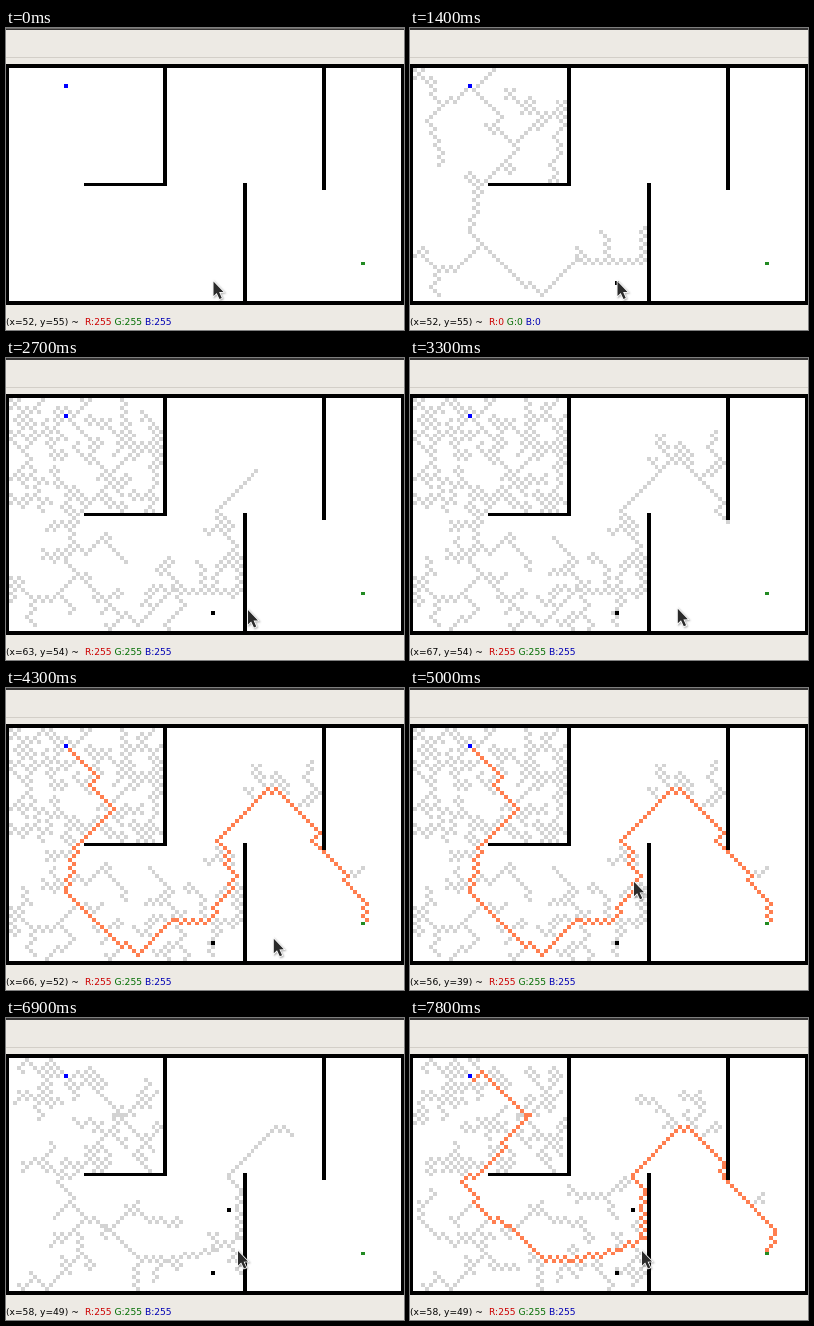
Animation, 398 px wide and 302 px high, one loop 8000 ms. Source, as an HTML page with a canvas:

```html
<!DOCTYPE html>
<html lang="en">
<head>
<meta charset="utf-8">
<title>Path planning</title>
<style>
html, body { margin: 0; width: 100%; height: 100%; overflow: hidden; background: #edeae4; }
canvas { display: block; }
</style>
</head>
<body>
<canvas id="stage" width="398" height="302"></canvas>
<script>
const ctx = document.getElementById("stage").getContext("2d");
const LOOP = 8000, STEP = 100;
const START = [15, 5], GOAL = [90, 50];

// cell rectangles: first column, first row, last column, last row
const WALLS = [
  [0, 0, 100, 0], [0, 60, 100, 60], [0, 0, 0, 60], [100, 0, 100, 60],
  [40, 0, 40, 30], [20, 30, 40, 30], [60, 30, 60, 60], [80, 0, 80, 31]
];
const ROOM = [1, 1, 39, 29], HALL = [1, 31, 59, 59], LOFT = [57, 8, 79, 19], EAST = [86, 34, 91, 37];
const CLICKS = [{ cell: [52, 55], at: 800 }, { cell: [56, 39], at: 5500 }];

const colX = c => Math.round(c * 3.96 - 1);
const rowY = r => Math.round(36 + r * 3.95);
const colAt = x => Math.floor((x + 1) / 3.96);
const rowAt = y => Math.floor((y - 36) / 3.95);
const points = s => s.split(" ").map(p => p.split(",").map(Number));
const isWall = (c, r) => WALLS.some(w => c >= w[0] && r >= w[1] && c <= w[2] && r <= w[3]);
const isClicked = (c, r, t) => CLICKS.some(k => k.cell[0] === c && k.cell[1] === r && t >= k.at);
const isFree = (c, r) => !isWall(c, r) && !isClicked(c, r, LOOP);

function random(seed) {
  return () => {
    seed = (seed + 0x6D2B79F5) | 0;
    let x = Math.imul(seed ^ (seed >>> 15), 1 | seed);
    x ^= x + Math.imul(x ^ (x >>> 7), 61 | x);
    return ((x ^ (x >>> 14)) >>> 0) / 4294967296;
  };
}

// Diagonal steps that zigzag along the straight line between two cells.
function walk(from, to) {
  const delta = to.map((v, i) => v - from[i]);
  const n = Math.max(...delta.map(Math.abs));
  const out = [];
  let at = from;
  for (let k = 1; k <= n; k++) {
    at = at.map((v, i) => {
      if (Math.abs(delta[i]) === n || k === n) return v + Math.sign(to[i] - v);
      return v + (from[i] + delta[i] * k / n > v ? 1 : -1);
    });
    out.push(at);
  }
  return out;
}

// Each stage extends the trunk to its key points, then sprouts random twigs.
function grow({ seed, from, solved, stages }) {
  const rand = random(seed), cells = [], used = new Set(), route = [START];
  const pick = (lo, hi) => lo + Math.floor(rand() * (hi - lo + 1));
  const coin = () => (rand() < 0.5 ? -1 : 1);

  function add([c, r], born) {
    const key = c + "," + r;
    if (used.has(key) || !isFree(c, r)) return;
    used.add(key);
    cells.push({ c, r, born });
  }
  function nearest(c, r) {
    const dist = cell => (cell.c - c) ** 2 + (cell.r - r) ** 2;
    return cells.reduce((a, b) => (dist(b) < dist(a) ? b : a));
  }
  function sprout([c1, r1, c2, r2], length, t0, t1) {
    const c = pick(c1, c2), r = pick(r1, r2);
    const root = nearest(c, r);
    const begin = Math.max(root.born, t0);
    const born = begin + (t1 - begin) * rand();
    let x = root.c, y = root.r;
    for (let k = 0; k < length; k++) {
      x += Math.sign(c - x) || coin();
      y += Math.sign(r - y) || coin();
      if (!isFree(x, y)) break;
      add([x, y], born);
    }
  }

  add(START, from);
  let t0 = from;
  for (const { until, trunk, spur, twigs } of stages) {
    const line = [];
    let at = route[route.length - 1];
    for (const key of points(trunk)) {
      line.push(...walk(at, key));
      at = key;
    }
    route.push(...line);
    if (spur) line.push(...walk(at, spur));
    line.forEach((cell, i) => add(cell, t0 + (until - t0) * (i + 1) / line.length));
    for (const [area, count, length] of twigs) {
      for (let i = 0; i < count; i++) sprout(area, length, t0, until);
    }
    t0 = until;
  }
  return { cells, route, from, solved };
}

const first = grow({
  seed: 11, from: 800, solved: 3600,
  stages: [
    { until: 1400, trunk: "23,13 21,15 27,21 18,30 16,38 15,42 27,54 33,58 43,49 50,50",
      spur: [59, 49], twigs: [[ROOM, 22, 8], [HALL, 10, 7]] },
    { until: 2200, trunk: "51,49 58,38 55,35", twigs: [[ROOM, 45, 5], [HALL, 28, 5]] },
    { until: 3300, trunk: "56,32 53,29 65,17 69,17 79,27 77,29 80,32",
      twigs: [[ROOM, 45, 5], [HALL, 35, 5], [LOFT, 10, 8]] },
    { until: 3500, trunk: "91,45 90,50", twigs: [[EAST, 1, 5]] }
  ]
});

const second = grow({
  seed: 29, from: 5500, solved: 7800,
  stages: [
    { until: 6000, trunk: "16,6 18,4 30,15 18,29 13,32 20,41 25,43 34,52 41,52 53,49 59,46",
      twigs: [[ROOM, 18, 8], [HALL, 5, 7]] },
    { until: 7200, trunk: "58,38 59,34 56,30 67,19 70,18 79,28 79,31",
      twigs: [[ROOM, 60, 5], [HALL, 55, 5], [LOFT, 10, 8]] },
    { until: 7700, trunk: "80,32 92,45 90,50", twigs: [[ROOM, 10, 5], [EAST, 1, 5]] }
  ]
});

const REST = [207.5, 253.4];
const MOVES = [
  { from: 2300, until: 3000, to: [267.8, 250.8] },
  { from: 4300, until: 5000, to: [224, 193.8] },
  { from: 5500, until: 6100, to: [232, 233] }
];
function pointerAt(t) {
  return MOVES.reduce((at, m) => {
    const f = Math.min(1, Math.max(0, (t - m.from) / (m.until - m.from)));
    return at.map((v, i) => v + (m.to[i] - v) * f);
  }, REST);
}

function rect(color, x, y, w, h) {
  ctx.fillStyle = color;
  ctx.fillRect(x, y, w, h);
}
function block(color, c, r, c2 = c, r2 = r) {
  const x = colX(c), y = rowY(r);
  rect(color, x, y, colX(c2 + 1) - x, rowY(r2 + 1) - y);
}

function drawCursor(x, y) {
  const shape = points("0,0 0,14.5 3.2,11.5 6,17.5 8.3,16.5 5.6,10.7 10,10.5");
  ctx.save();
  ctx.translate(x, y);
  ctx.beginPath();
  shape.forEach(p => ctx.lineTo(...p));
  ctx.closePath();
  ctx.shadowColor = "rgba(0,0,0,.35)";
  ctx.shadowBlur = 2;
  ctx.shadowOffsetX = ctx.shadowOffsetY = 1;
  ctx.strokeStyle = "#fff";
  ctx.lineWidth = 1.6;
  ctx.stroke();
  ctx.shadowColor = "transparent";
  ctx.fillStyle = "#2b2b2b";
  ctx.fill();
  ctx.restore();
}

// The readout runs one step ahead of the drawn pointer.
function drawStatus(t) {
  const [x, y] = pointerAt(t + STEP);
  const c = colAt(x), r = rowAt(y);
  const value = isWall(c, r) || isClicked(c, r, t) ? 0 : 255;
  ctx.font = '9.15px "DejaVu Sans", sans-serif';
  ctx.fillStyle = "#000";
  ctx.fillText(`(x=${c}, y=${r}) ~`, 0, 297);
  let left = 79;
  for (const [name, color] of [["R", "#cc0000"], ["G", "#006c00"], ["B", "#0000b4"]]) {
    const text = `${name}:${value} `;
    ctx.fillStyle = color;
    ctx.fillText(text, left, 297);
    left += ctx.measureText(text).width;
  }
}

function draw(time) {
  const t = Math.floor(time / STEP) * STEP;
  rect("#edeae4", 0, 0, 398, 302);
  rect("#363535", 0, 0, 398, 2);
  if (t < 400) rect("#6b6967", 0, 0, 398, 1);
  rect("#d3cfc8", 0, 29, 398, 1);
  block("#fff", 0, 0, 100, 60);

  const tree = t < second.from ? first : second;
  for (const cell of tree.cells) if (cell.born <= t) block("#d3d3d3", cell.c, cell.r);
  if (t >= tree.solved) tree.route.forEach(p => block("#ff7f50", ...p));

  WALLS.forEach(w => block("#000", ...w));
  CLICKS.forEach(k => { if (t >= k.at) block("#000", ...k.cell); });
  block("#0000ff", ...START);
  block("#228b22", ...GOAL);
  drawStatus(t);
  drawCursor(...pointerAt(t));
}

const begin = performance.now();
function frame() {
  draw((performance.now() - begin) % LOOP);
  requestAnimationFrame(frame);
}
frame();
</script>
</body>
</html>
```
